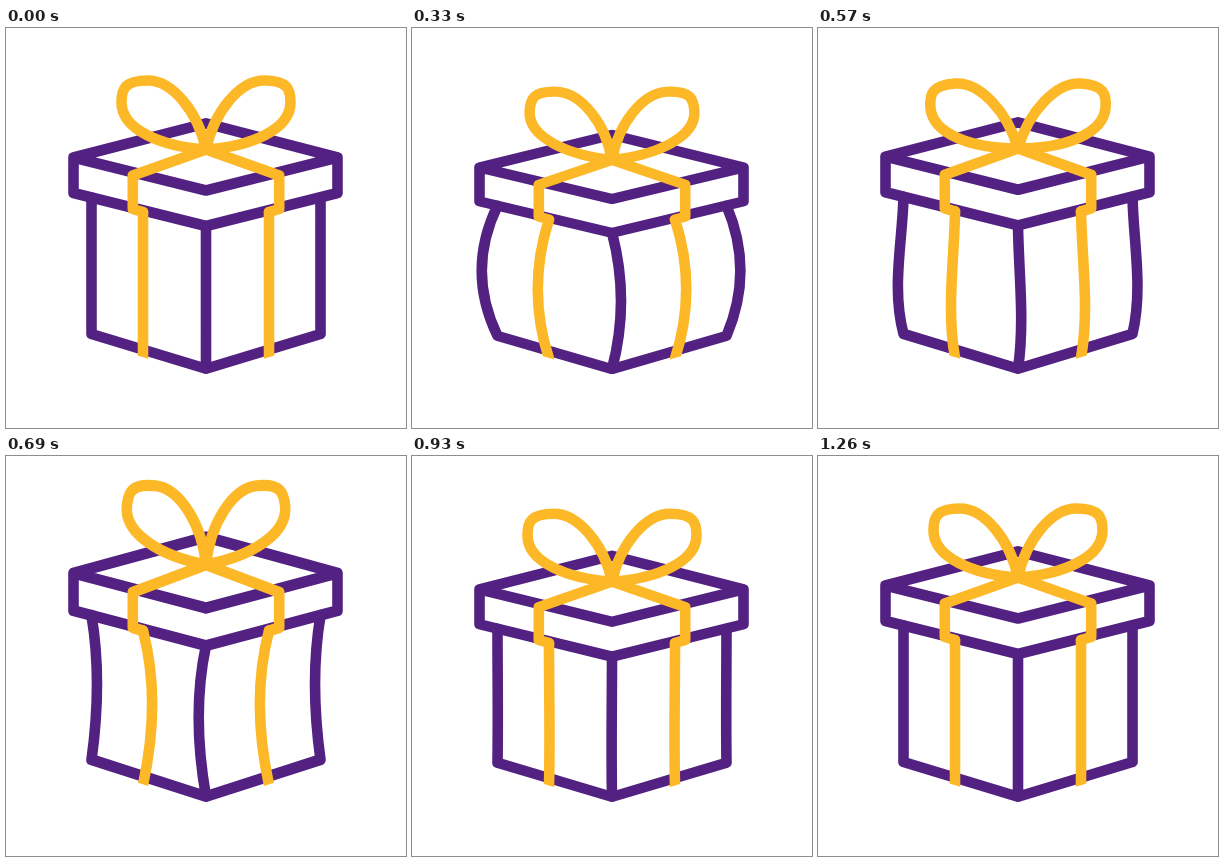
These frames come from a looping animation (400 px wide and 400 px high, 3320 ms). An HTML page:

```html
<!DOCTYPE html>
<html lang="en">
<head>
<meta charset="utf-8">
<title>Gift box</title>
<style>
  html, body { margin: 0; width: 100%; height: 100%; overflow: hidden; background: #fff; }
  svg { display: block; width: 100vw; height: 100vh; }
  g { fill: none; stroke-width: 10.6; stroke-linejoin: round; stroke-linecap: round; }
  .box { stroke: #522182; }
  .ribbon { stroke: #fdb827; }
</style>
</head>
<body>
<svg viewBox="0 0 400 400">
  <clipPath id="hem"><path d="M100 0V318L200 348.3L300 318V0Z"/></clipPath>
  <g id="gift">
    <g class="box">
      <path id="sides"/>
      <path d="M67.5 129.5L200 95.3L331.5 129.5V165L200 198L67.5 165ZL200 162.5L331.5 129.5"/>
    </g>
    <g class="ribbon">
      <path id="bands" clip-path="url(#hem)"/>
      <path d="M137 184L126.8 181V147.5L200 121.5L273.2 147.5V181L263 184"/>
      <g transform="translate(200 121.5)">
        <path id="left"/>
        <path id="right"/>
      </g>
    </g>
  </g>
</svg>
<script>
  const LOOP = 3320, STEP = 30, LAG = 45, FLOOR = 346;
  const LOOP_SHAPE = "M0 0C-8 -38 -34 -69 -58 -69S-84.5 -60 -84.5 -47C-84.5 -20 -45 -3 0 0";

  // [time, value] poses: squash, spring up, settle
  const stretch = [[0, 1], [390, 0.951], [450, 0.951], [690, 1.057], [930, 0.982], [1110, 1.007], [1260, 1]];
  const bulge = [[0, 0], [240, 1], [450, 1], [690, -0.9], [930, 0]];
  const tilt = [[0, 0], [210, 5], [450, 0], [570, -4], [690, 6], [930, 0]];

  const $ = id => document.getElementById(id);
  const set = (id, name, value) => $(id).setAttribute(name, value);

  // Sine ease from pose to pose, holding the first and last.
  function pose(keys, t) {
    const next = keys.findIndex(k => k[0] > t);
    if (next < 0) return keys[keys.length - 1][1];
    if (next === 0) return keys[0][1];
    const [t0, a] = keys[next - 1], [t1, b] = keys[next];
    return a + (b - a) * (1 - Math.cos(Math.PI * (t - t0) / (t1 - t0))) / 2;
  }

  function draw(t) {
    const upper = pose(bulge, t), lower = pose(bulge, t - LAG);

    // Vertical line bent sideways; its lower half follows a little later.
    function bent(x, top, bottom, out, inn = out) {
      const push = b => x + b * (b > 0 ? out : inn);
      const third = (bottom - top) / 3;
      return `M${x} ${top}C${push(upper)} ${top + third} ${push(lower)} ${bottom - third} ${x} ${bottom}`;
    }

    set("sides", "d", bent(85.5, 169.5, 306, -21, -9) + "L200 340.8L314.5 306"
      + bent(314.5, 169.5, 306, 18.5, 9) + bent(200, 198, 340.8, 12));
    set("bands", "d", bent(137, 184, 330, -15) + bent(263, 184, 330, 15));

    const angle = pose(tilt, t);
    set("left", "transform", `rotate(${angle})`);
    set("right", "transform", `scale(-1 1) rotate(${angle})`);
    set("gift", "transform",
      `translate(0 ${FLOOR}) scale(1 ${pose(stretch, t)}) translate(0 ${-FLOOR})`);
  }

  set("left", "d", LOOP_SHAPE);
  set("right", "d", LOOP_SHAPE);

  const start = performance.now();
  function tick() {
    const t = (performance.now() - start) % LOOP;
    draw(Math.floor(t / STEP) * STEP);
    requestAnimationFrame(tick);
  }
  tick();
</script>
</body>
</html>
```
